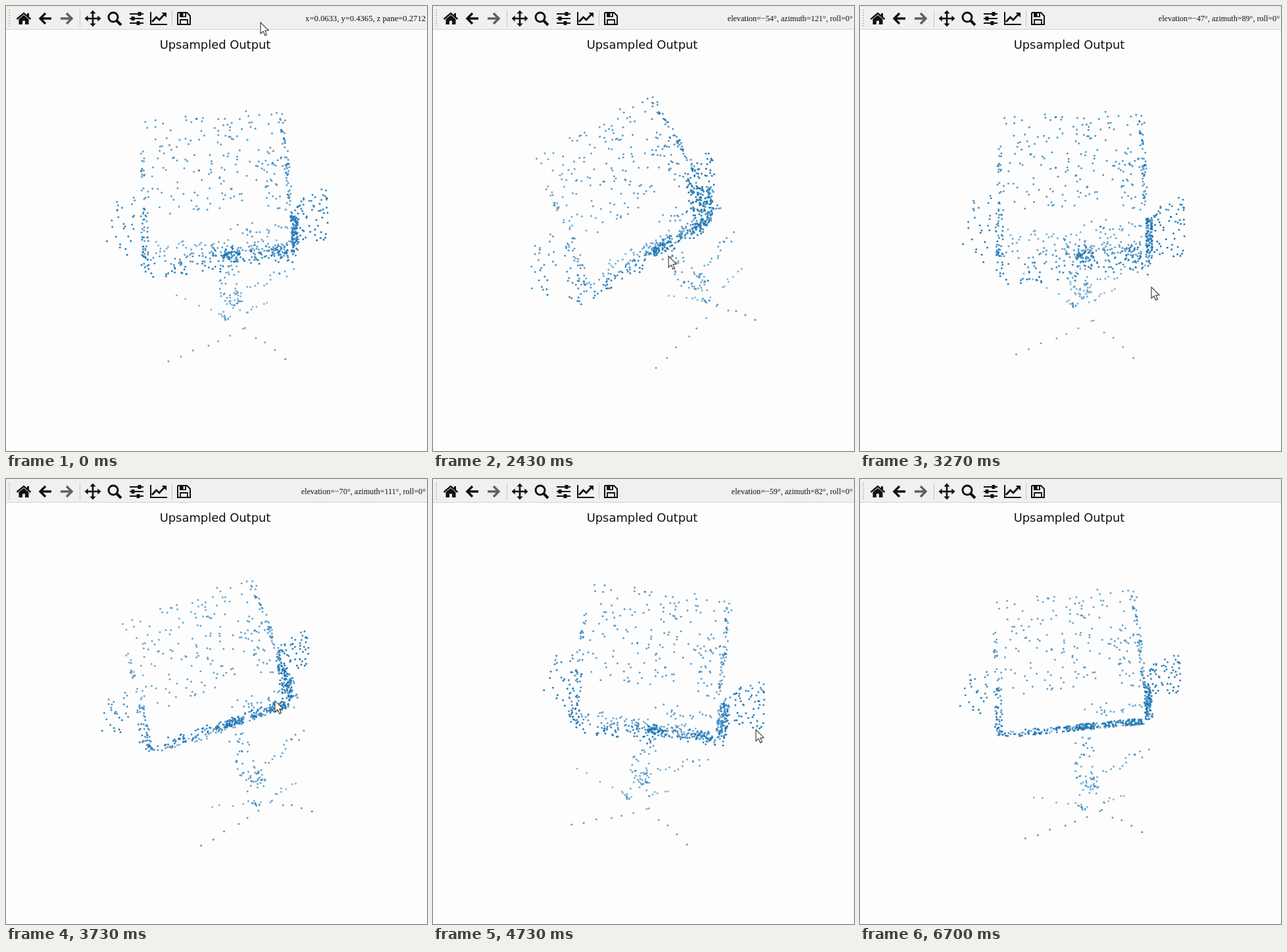
An HTML page with a canvas for the animation above (6730 ms loop, 640 by 676 pixels).

```html
<!DOCTYPE html>
<html lang="en">
<head>
<meta charset="utf-8">
<title>Upsampled Output</title>
<style>
html, body { margin: 0; width: 100%; height: 100%; overflow: hidden; background: #fdfdfd; }
canvas { display: block; }
</style>
</head>
<body>
<canvas id="stage" width="640" height="676"></canvas>
<script>
const ctx = document.getElementById('stage').getContext('2d');
const LOOP = 6730, DRAG_FROM = 1440, DRAG_TO = 5960, LEAVE = 6290;
const LAG = 50; // the plot redraws a little after the pointer
const CX = 318, CY = 362;
const INK = '#111', PAPER = '#fdfdfd', BAR = '#f0f0f0';

// Turning points of the drag
const KEYS = [
  { t: 0, az: 92.5, tilt: 55, x: 387, y: 25 },
  { t: 740, az: 92.5, tilt: 55, x: 104, y: 330 },
  { t: 1300, az: 92.5, tilt: 55, x: 451, y: 398 },
  { t: 2430, az: 122, tilt: 54, x: 358, y: 380 },
  { t: 3270, az: 89, tilt: 47, x: 443, y: 427 },
  { t: 3730, az: 111, tilt: 70, x: 409, y: 337 },
  { t: 3860, az: 116, tilt: 70, x: 396, y: 336 },
  { t: 4600, az: 76.5, tilt: 60, x: 500, y: 392 },
  { t: 4730, az: 82, tilt: 59, x: 491, y: 381 },
  { t: 5300, az: 100, tilt: 57, x: 440, y: 345 },
  { t: 5960, az: 94, tilt: 67, x: 448, y: 350 },
  { t: 6290, az: 94, tilt: 67, x: -14, y: 330 }
];

let seed = 20;
function rnd() {
  seed = (seed + 0x6D2B79F5) | 0;
  let t = Math.imul(seed ^ (seed >>> 15), 1 | seed);
  t = (t + Math.imul(t ^ (t >>> 7), 61 | t)) ^ t;
  return ((t ^ (t >>> 14)) >>> 0) / 4294967296;
}
const range = (a, b) => a + (b - a) * rnd();
const jit = r => range(-r, r);
const mix = (a, b, t) => a + (b - a) * t;

// Chair cloud: p runs to the right, y up, z through the depth
const cloud = [];
const add = (p, y, z) => cloud.push([p, y, z]);
const repeat = (n, f) => { for (let i = 0; i < n; i++) f(i / (n - 1)); };

function backPoint(p, t) {
  add(p, 148 - 127 * t + jit(4), 132 - 71 * t + jit(4));
}
function seatPoint(p, z) {
  add(p, -18 - 0.424 * z + 0.036 * p + jit(5), z);
}
// Side panel: a four-cornered patch of (y, z)
function panel(n, p, spread, [a, b, c, d]) {
  repeat(n, () => {
    const u = rnd(), v = rnd();
    const at = k => mix(mix(a[k], b[k], u), mix(d[k], c[k], u), v);
    add(p + jit(spread), at(0), at(1));
  });
}
function line(n, a, b, r) {
  repeat(n, t => add(...a.map((v, k) => mix(v, b[k], t) + jit(r))));
}

function buildChair() {
  // back
  repeat(180, () => backPoint(-104 + 216 * Math.pow(rnd(), 0.75), rnd()));
  repeat(52, () => { const t = rnd(); backPoint(108 + 8 * t + jit(4), t); });
  repeat(22, () => backPoint(-107 + jit(3), range(0.35, 1)));

  // seat
  repeat(150, () => seatPoint(112 - 122 * Math.pow(rnd(), 1.1), (rnd() + rnd() - 1) * 100));
  repeat(80, () => seatPoint(range(-100, 10), range(-125, 95)));
  repeat(40, () => seatPoint(range(10, 38), range(-30, 28)));
  repeat(32, () => seatPoint(range(84, 110), range(-35, 22)));
  repeat(20, () => add(range(20, 112), -12 + jit(9), 55 + jit(10)));

  // sides and arms
  panel(120, 121.5, 5, [[66, -8], [33, -106], [-20, 20], [0, 60]]);
  panel(52, -106, 6, [[56, 32], [38, -136], [-25, 0], [0, 50]]);
  repeat(58, () => {
    const u = rnd();
    add(128 + 47 * u, 78 + jit(8), range(-108, -8 + 32 * Math.sqrt(u)));
  });
  repeat(26, () => add(range(-163, -118), 64 + jit(12), range(-112, 38)));

  // stem, hub and star base
  repeat(44, () => add(17 + jit(16), range(-140, -42), 24 + jit(12)));
  repeat(14, () => add(29 + jit(7), range(-138, -110), 37 + jit(6)));
  line(11, [0, -164, 46], [16, -172, 50], 4);
  line(14, [45, -110, 39], [112, -78, 37], 6);
  line(5, [-68, -181, 128], [0, -172, 56], 4);
  line(7, [72, -173, 88], [36, -164, 56], 5);
  line(7, [37, -156, -5], [-77, -168, -66], 3);
  line(5, [37, -156, -5], [101, -163, -72], 3);
}

// Monotone curve through the keys
function track(name, t) {
  const last = KEYS.length - 1;
  if (t <= 0) return KEYS[0][name];
  if (t >= KEYS[last].t) return KEYS[last][name];
  const i = KEYS.findIndex(k => k.t > t) - 1;
  const slope = j => j < 0 || j >= last ? 0 : (KEYS[j + 1][name] - KEYS[j][name]) / (KEYS[j + 1].t - KEYS[j].t);
  const tangent = j => {
    const a = slope(j - 1), b = slope(j);
    return a * b <= 0 ? 0 : 2 * a * b / (a + b);
  };
  const h = KEYS[i + 1].t - KEYS[i].t, s = (t - KEYS[i].t) / h, r = 1 - s;
  return KEYS[i][name] * (1 + 2 * s) * r * r + KEYS[i + 1][name] * (3 - 2 * s) * s * s
    + h * (tangent(i) * s * r * r - tangent(i + 1) * s * s * r);
}

function drawCloud(t) {
  const a = track('az', t) * Math.PI / 180, e = track('tilt', t) * Math.PI / 180;
  const sa = Math.sin(a), ca = Math.cos(a), se = Math.sin(e), ce = Math.cos(e);
  const dots = cloud.map(([p, y, z]) => ({
    x: CX + p * sa + y * ca,
    y: CY + se * ca * p - se * sa * y - ce * z,
    depth: -ce * ca * p + ce * sa * y - se * z
  })).sort((m, n) => m.depth - n.depth);
  for (const { x, y, depth } of dots) {
    const near = Math.min(1, Math.max(0, (depth + 130) / 230));
    ctx.fillStyle = `rgba(31,119,180,${0.52 + 0.45 * near})`;
    ctx.beginPath();
    ctx.arc(x, y, 1.5, 0, 7);
    ctx.fill();
  }
}

function ink(c) { ctx.fillStyle = ctx.strokeStyle = c; }
function stroke(w, ...paths) {
  ctx.lineWidth = w;
  ctx.beginPath();
  for (const p of paths) p.forEach(([x, y], i) => i ? ctx.lineTo(x, y) : ctx.moveTo(x, y));
  ctx.stroke();
}
function poly(...pts) {
  ctx.beginPath();
  pts.forEach(p => ctx.lineTo(...p));
  ctx.closePath();
  ctx.fill();
}
function arrow(x, dir, color) {
  ink(color);
  stroke(3.4, [[x + dir * 9, 19], [x - dir * 8, 19]], [[x, 11], [x - dir * 8, 19], [x, 27]]);
}

function drawToolbar() {
  ink(BAR);
  ctx.fillRect(0, 0, 640, 36);
  ink('#d2d2c0');
  ctx.fillRect(0, 35, 640, 1);
  ink('#c6c6c6');
  for (let y = 5; y < 32; y += 4) ctx.fillRect(4, y, 2, 2);
  ctx.fillRect(112, 6, 1, 25);
  ctx.fillRect(252, 6, 1, 25);

  // home
  ink(INK);
  stroke(2.4, [[16.5, 20], [27, 11], [37.5, 20]]);
  ctx.fillRect(32, 11, 3, 5);
  poly([19.5, 20], [27, 13.8], [34.5, 20], [34.5, 28], [29, 28], [29, 22.5], [25, 22.5], [25, 28], [19.5, 28]);

  arrow(60, 1, INK);
  arrow(92, -1, '#606060');

  // pan
  ink(INK);
  stroke(2.6, [[122, 19], [142, 19]], [[132, 9], [132, 29]]);
  for (let i = 0; i < 4; i++) {
    ctx.save();
    ctx.translate(132, 19);
    ctx.rotate(i * Math.PI / 2);
    poly([0, -12.5], [4.6, -7.4], [-4.6, -7.4]);
    ctx.restore();
  }

  // zoom
  ctx.lineWidth = 3;
  ctx.beginPath();
  ctx.arc(163, 17, 7, 0, 7);
  ctx.stroke();
  stroke(4, [[168.5, 22.5], [175, 29]]);

  // sliders
  [203, 193, 201].forEach((x, i) => {
    const y = 12 + 7 * i;
    stroke(2, [[188, y], [209, y]]);
    ctx.fillRect(x - 2.5, y - 3, 5, 6);
  });

  // axes
  stroke(2, [[220, 9], [220, 28], [245, 28]]);
  stroke(2.8, [[222, 24], [228.5, 17], [233, 21], [241, 12.5]]);
  poly([236.5, 10], [244, 10], [244, 17.5]);

  // save
  stroke(2, [[261, 10], [275, 10], [280, 15], [280, 28], [261, 28], [261, 10]]);
  stroke(1.8, [[265, 28], [265, 21], [276, 21], [276, 28]]);
  ctx.fillRect(264, 10, 10, 7);
  ink(BAR);
  ctx.fillRect(269.5, 11, 2.5, 4.5);
}

function signed(v, digits) {
  return (v < 0 ? '\u2212' : '') + Math.abs(v).toFixed(digits);
}
function drawText(text, size, family, align, x, y) {
  ctx.font = `${size}px ${family}`;
  ctx.textAlign = align;
  ctx.fillStyle = INK;
  ctx.fillText(text, x, y);
}
function drawLabel(t, x, y) {
  const serif = '"Liberation Serif", serif';
  if (t >= DRAG_FROM && t < DRAG_TO) {
    const text = `elevation=${signed(-track('tilt', t), 0)}°, azimuth=${Math.floor(track('az', t))}°, roll=0°`;
    drawText(text, 12.1, serif, 'right', 638, 22.5);
  } else {
    const dx = x - 387, dy = y - 25;
    const px = 0.0633 - 0.0033 * dx - 0.0002067 * dy, py = 0.4365 - 0.001768 * dy;
    drawText(`x=${signed(px, 4)}, y=${signed(py, 4)}, z pane=0.2712`, 12.6, serif, 'right', 638, 22.5);
  }
}

function drawPointer(x, y) {
  ctx.save();
  ctx.translate(x, y);
  ink('#fff');
  poly([0, 0], [0, 17], [4, 13.4], [6.8, 19.8], [9.4, 18.6], [6.8, 12.4], [12, 12]);
  ctx.strokeStyle = '#333';
  ctx.lineWidth = 1.1;
  ctx.stroke();
  ctx.restore();
}

function draw(t) {
  ctx.fillStyle = PAPER;
  ctx.fillRect(0, 0, 640, 676);
  drawToolbar();
  drawText('Upsampled Output', 17.9, '"DejaVu Sans", sans-serif', 'center', 318, 65);
  drawCloud(t - LAG);
  if (t < LEAVE) {
    const x = track('x', t), y = track('y', t);
    drawLabel(t, x, y);
    drawPointer(x, y);
  }
}

buildChair();
const start = performance.now();
function tick(now) {
  draw(Math.max(0, now - start) % LOOP);
  requestAnimationFrame(tick);
}
draw(0);
requestAnimationFrame(tick);
</script>
</body>
</html>
```
